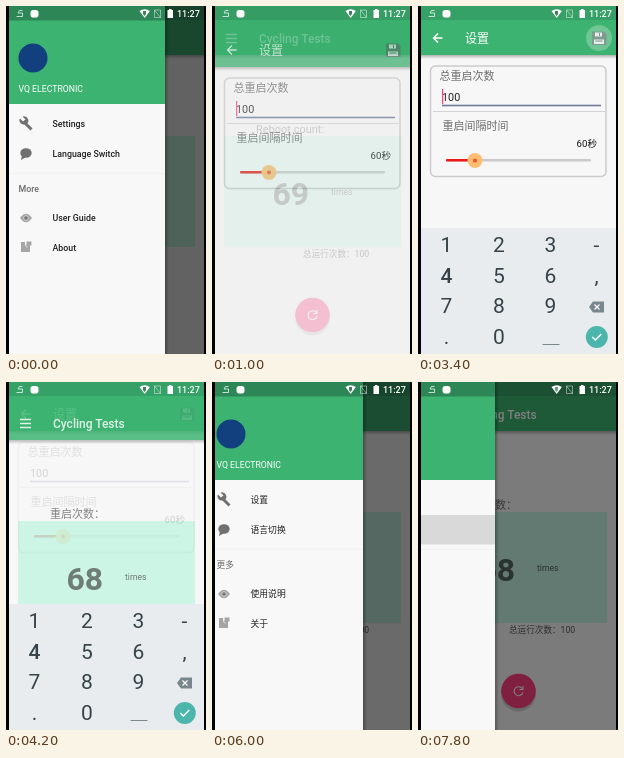
An HTML page for the animation above (8000 ms loop, 200x348 px).

```html
<!DOCTYPE html>
<html lang="zh">
<head>
<meta charset="utf-8">
<style>
html, body { margin: 0; width: 100%; height: 100%; overflow: hidden; background: #000; }
svg { display: block; width: 100vw; height: 100vh; }
text { font-family: Roboto, "Noto Sans CJK SC", "Noto Sans CJK", sans-serif; white-space: pre; }
.title { font-size: 12px; font-weight: 500; fill: #fff; }
.label { font-size: 11px; fill: #6c6c6c; }
.item { font-size: 8.8px; font-weight: 500; fill: #222; }
.line { fill: none; stroke: #fff; stroke-width: 1.4; }
#keys text { font-size: 21px; fill: #37434a; text-anchor: middle; }
</style>
</head>
<body>
<svg viewBox="0 0 200 348" preserveAspectRatio="none">
  <defs>
    <linearGradient id="fall" x2="0" y2="1">
      <stop stop-opacity=".28"/><stop offset="1" stop-opacity="0"/>
    </linearGradient>
    <linearGradient id="side">
      <stop stop-opacity=".3"/><stop offset="1" stop-opacity="0"/>
    </linearGradient>
    <g id="page">
      <rect x="3" width="195" height="348" fill="#f7f7f7"/>
      <rect x="3" y="49" width="195" height="4" fill="url(#fall)"/>
      <rect x="3" width="195" height="49" fill="#3cb371"/>
    </g>
  </defs>

  <rect x="3" width="195" height="348" fill="#3cb371"/>
  <g id="screens">
    <g id="home">
      <use href="#page"/>
      <path class="line" d="M14 28.500h11M14 32.500h11M14 36.500h11"/>
      <text class="title" x="47" y="37">Cycling Tests</text>
      <text class="label" id="caption" x="44" y="127"></text>
      <rect x="12" y="130" width="177" height="111" fill="#c5f5e3"/>
      <text id="count" x="60.500" y="198.500" font-size="32" font-weight="700" fill="#55665f"></text>
      <text x="119" y="189" font-size="8.600" fill="#55645e">times</text>
      <text x="91" y="251" font-size="8.600" fill="#5c5c5c">总运行次数：100</text>
      <circle cx="100.500" cy="312" r="17.500" opacity=".14"/>
      <circle cx="100.500" cy="309" r="17.300" fill="#ff4081"/>
      <path class="line" d="M104.200 306.500a4.500 4.500 0 1 0 .7 4M105 304v3.500h-3.500" style="stroke-width:1.100"/>
    </g>
    <g id="settings">
      <use href="#page"/>
      <path class="line" d="M24.500 32H15.500M20 27.500L15.500 32l4.500 4.500"/>
      <text class="title" x="47" y="36.500" style="font-weight:400">设置</text>
      <path d="M174 25.500h12l2.500 2.500v11h-14.500z" fill="#54796a"/>
      <path d="M177 26.500h7v4h-7zM176 33.500h10v4.500h-10z" fill="#d8e8df"/>
      <path d="M181.500 27v3M177.500 35h7" stroke="#54796a"/>
      <circle id="press" cx="181" cy="32" r="13" fill="#fff"/>
      <rect x="12.500" y="60" width="175.500" height="110.500" rx="5" fill="none" stroke="#cbcbcb" stroke-width="1.500"/>
      <text class="label" x="21.500" y="74">总重启次数</text>
      <text x="24" y="95" font-size="10.800" fill="#222">100</text>
      <rect x="24" y="98.700" width="159" height="1.600" fill="#6b7896"/>
      <rect id="cursor" x="24" y="83" width="1.200" height="15" fill="#ff4081"/>
      <path d="M15 105.500h172" stroke="#d3d3d3"/>
      <text class="label" x="24.500" y="123.500">重启间隔时间</text>
      <text x="179" y="140.500" font-size="9.600" text-anchor="end" fill="#111">60秒</text>
      <rect x="28" y="153" width="145" height="2.600" rx="1" fill="#cacaca"/>
      <rect x="28" y="153" width="30" height="2.600" rx="1" fill="#f01818"/>
      <circle cx="57" cy="154.500" r="7.500" fill="#ffbd72"/>
      <circle cx="57" cy="154.500" r="2" fill="#f0502a"/>
    </g>
  </g>
  <g id="keyboard">
    <rect x="3" y="222" width="195" height="126" fill="#e8ecee"/>
    <g id="keys"></g>
    <g id="actions">
      <path d="M171 301l4-5.500h11v11h-11z" fill="#78868d"/>
      <path class="line" d="M176.500 298.500l5 5m0-5l-5 5" style="stroke-width:1.200"/>
      <circle cx="178.800" cy="331" r="11" fill="#4db6ac"/>
      <path class="line" d="M174.300 331l3 3 6-6"/>
    </g>
  </g>
  <rect x="3" width="195" height="14" opacity=".1"/>
  <rect id="scrim" x="3" width="195" height="348"/>

  <g id="drawer">
    <rect x="159" width="4" height="348" fill="url(#side)"/>
    <rect x="3" width="156" height="348" fill="#f8f8f8"/>
    <rect x="3" width="156" height="98" fill="#3cb371"/>
    <rect x="3" width="156" height="14.500" opacity=".25"/>
    <circle cx="27" cy="52" r="14.500" fill="#123f7d"/>
    <text x="12.500" y="86" font-size="8.700" fill="#fff">VQ ELECTRONIC</text>
    <rect id="row" x="3" width="156" height="29.500" fill="#d9d9d9"/>
    <path d="M3 167.500h156" stroke="#f1f1f1"/>
    <path d="M17.500 115.500l8 8" stroke="#707070" stroke-width="3"/>
    <path d="M14 112.500l3 3 2.500-2-3-3q4-1 5.500 2.500t-2 5-5.500-1-.5-4.500z" fill="#707070"/>
    <ellipse cx="20" cy="147" rx="5.700" ry="4.800" fill="#707070"/>
    <path d="M16 149l-1 5 5-3z" fill="#707070"/>
    <path d="M14 212q6-8.500 12 0q-6 8.500-12 0z" fill="#a5a5a5"/>
    <circle cx="20" cy="212" r="2.300" fill="#777" stroke="#eee" stroke-width=".7"/>
    <path d="M15 239h9v7h-9zM15 236h4v3h-4zM20.500 235.500h5v4h-5z" fill="#a5a5a5"/>
    <path d="M19.700 236v4l2 1.500" fill="none" stroke="#eee" stroke-width=".8"/>
    <g id="menu"></g>
  </g>

  <g id="status" fill="#fff">
    <path d="M16.500 4.500h-3l-1.500 2.500h4.500v3.500h-6" fill="none" stroke="#fff" stroke-width=".9" opacity=".8"/>
    <rect x="24.500" y="4" width="8" height="7.500" rx="2.800"/>
    <path d="M133.500 5q5.200-3.500 10.400 0l-5.200 7z"/>
    <path id="signal" d="M137 5h3v3l-1.500 2-1.500-2z" fill="#2d6e4b"/>
    <path d="M148.500 4h6v7.500h-6zM148.500 4l6 7.500" fill="none" stroke="#fff" opacity=".45"/>
    <path d="M161.500 4h1.500v-1h2.500v1h1.500v8h-5.500z"/>
    <text x="171" y="11" font-size="9" font-weight="500">11:27</text>
  </g>
  <path d="M0 0h3v348h-3zM198 0h2v348h-2z"/>
</svg>
<script>
const LOOP = 8000, STEP = 200;
const $ = id => document.getElementById(id);

const words = {
  en: { menu: ["Settings", "Language Switch", "More", "User Guide", "About"], caption: "Reboot count:", count: 69 },
  zh: { menu: ["设置", "语言切换", "更多", "使用说明", "关于"], caption: "重启次数：", count: 68 }
};

$("menu").innerHTML = [121, 150.5, 185.5, 215, 244.5].map((y, i) =>
  `<text class="item" x="${i == 2 ? 12.5 : 46.5}" y="${y}"${i == 2 ? ' style="fill:#6c6c6c"' : ""}></text>`).join("");

// The space key is a wide, thin bar.
$("keys").innerHTML = ["123-", "456,", "789", ".0"].map((row, r) =>
  [...row].map((c, i) =>
    `<text x="${[28.5, 81, 132.5, 178.5][i]}" y="${246 + r * 30.7}"${c == "4" ? ' font-weight="500"' : ""}>${c}</text>`
  ).join("")).join("") + '<path d="M124.500 338.500h17" stroke="#7d888e"/>';

// Linear interpolation through [time, value] points, held at both ends.
function track(t, ...points) {
  let [t0, v0] = points[0];
  if (t <= t0) return v0;
  for (const [t1, v1] of points) {
    if (t < t1) return v0 + (v1 - v0) * (t - t0) / (t1 - t0);
    [t0, v0] = [t1, v1];
  }
  return v0;
}

function place(id, x, y, opacity = 1) {
  $(id).setAttribute("transform", `translate(${x} ${y})`);
  $(id).setAttribute("opacity", opacity);
}

const show = (id, opacity) => $(id).setAttribute("opacity", +opacity);

// A new screen rises and fades in over the previous one.
function enter(id, t, start, shift, alpha) {
  place(id, 0,
    track(t, [start, 28], [start + 200, 20], [start + 400, shift], [start + 600, 4], [start + 800, 1], [start + 1000, 0]),
    track(t, [start, 0], [start + 200, .3], [start + 400, alpha], [start + 600, 1]));
}

function setWords(lang) {
  const w = words[lang];
  [...$("menu").children].forEach((el, i) => el.textContent = w.menu[i]);
  $("caption").textContent = w.caption;
  $("count").textContent = w.count;
}

let last = -1;
function draw(t) {
  const back = t >= 3000;
  setWords(back ? "zh" : "en");
  $("screens").append(back ? $("home") : $("settings"));
  if (back) {
    place("settings", 0, 0);
    enter("home", t, 3800, 9, .84);
  } else {
    place("home", 0, 0);
    enter("settings", t, 600, 12, .72);
  }
  show("cursor", t < 2600 || (t >= 2800 && t < 3600));
  show("press", track(t, [3200, 0], [3400, .25], [3600, .15], [3800, 0]));

  place("keyboard", 0, track(t, [4400, 0], [4600, 45], [4800, 126]), t >= 1200 && t < 4800 ? 1 : 0);
  show("keys", track(t, [1200, 0], [2000, .75], [2400, .9], [2800, 1]));
  show("actions", track(t, [1200, 0], [2000, .9], [2400, 1]));

  const open = track(t, [0, 156], [200, 143], [400, 74], [600, 16], [800, 0], [5000, 0], [5200, 22],
    [5400, 70], [5600, 112], [5800, 137], [6000, 148], [6400, 155], [6600, 156], [7400, 156], [7600, 143], [7800, 74]);
  place("drawer", open - 156, 0, open > 0 ? 1 : 0);
  show("scrim", track(t, [0, .6], [200, .58], [400, .5], [600, .15], [1000, .025], [1200, 0], [5200, 0], [5400, .25],
    [5600, .43], [5800, .53], [6000, .57], [6600, .6], [7400, .6], [7600, .58], [7800, .5]));
  $("row").setAttribute("y", back ? 133 : 103);
  show("row", (t >= 200 && t < 800) || t >= 7600);
  show("signal", t < 7200 ? .9 : .7);
}

function tick(now) {
  const t = Math.floor(now % LOOP / STEP) * STEP;
  if (t != last) draw(last = t);
  requestAnimationFrame(tick);
}
draw(0);
requestAnimationFrame(tick);
</script>
</body>
</html>
```
